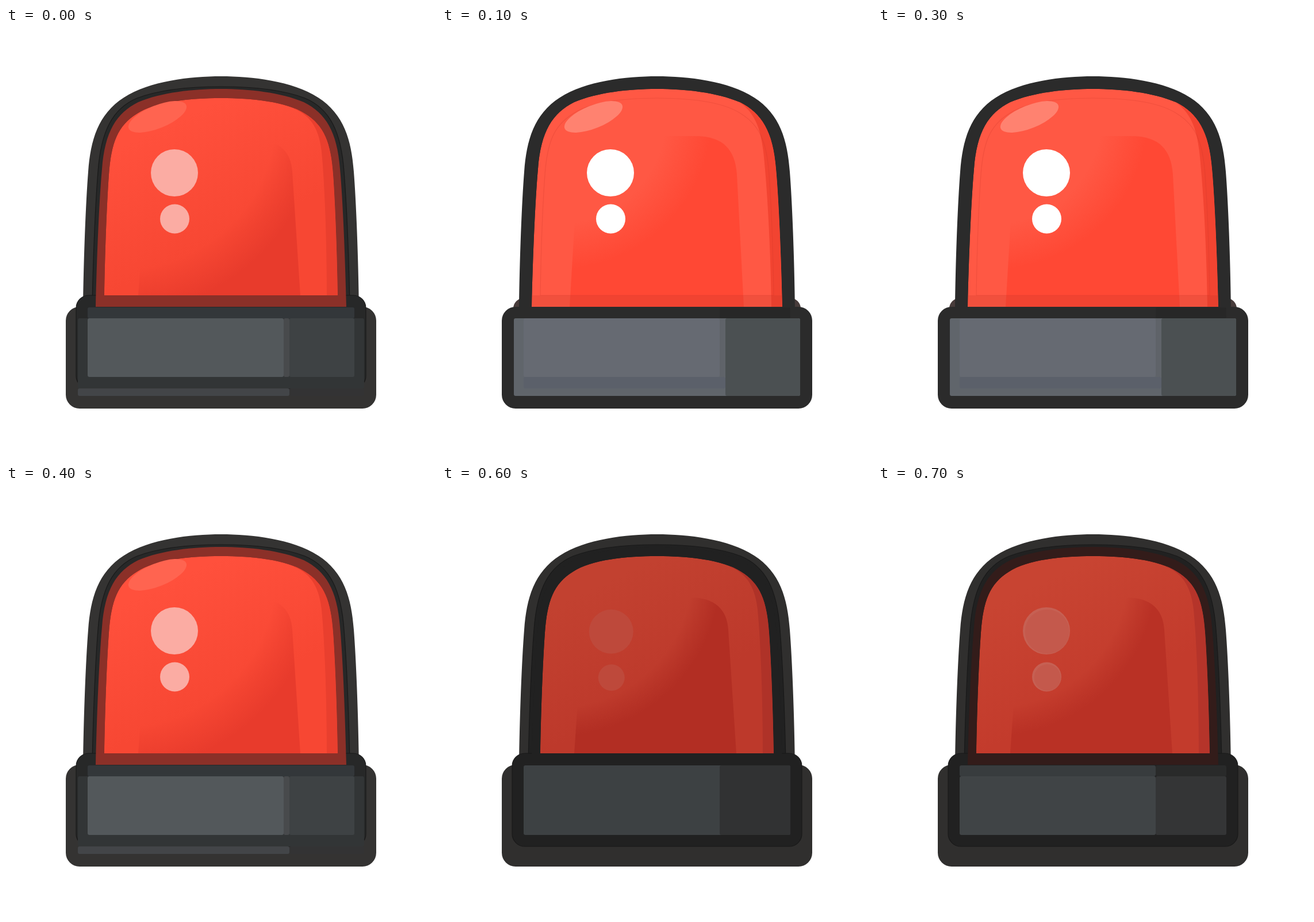
These frames come from a looping animation (748x748 px, 0.8 s). An HTML page with a canvas:

```html
<!DOCTYPE html>
<html lang="en">
<head>
<meta charset="utf-8">
<title>Warning light</title>
<style>
html, body { margin: 0; width: 100%; height: 100%; overflow: hidden; background: #fff; }
canvas { display: block; width: 100vmin; height: 100vmin; }
</style>
</head>
<body>
<canvas id="stage" width="748" height="748"></canvas>
<script>
const ctx = document.getElementById('stage').getContext('2d');
const SIZE = 748, STEP = 100;

// Left half of a dome from bottom to top, mirrored about the centre line.
function dome(p) {
  const path = new Path2D();
  const flip = i => [SIZE - p[i], p[i + 1]];
  path.moveTo(p[0], p[1]);
  for (let i = 2; i < p.length; i += 6) path.bezierCurveTo(...p.slice(i, i + 6));
  for (let i = p.length - 4; i > 0; i -= 6) {
    path.bezierCurveTo(...flip(i), ...flip(i - 2), ...flip(i - 4));
  }
  path.closePath();
  return path;
}

function box(x, y, w, h, r) {
  const path = new Path2D();
  path.roundRect(x, y, w, h, r);
  return path;
}

const big = {
  shell: dome([134, 490, 135, 400, 139, 300, 143, 250, 147, 195, 160, 150, 205, 121, 250, 92, 320, 84, 374, 84]),
  glass: dome([156, 485, 158, 400, 162, 300, 167, 245, 172, 180, 192, 148, 230, 129, 270, 112, 325, 106, 374, 106]),
  base: box(104, 485, 540, 177, 24),
  panel: new Path2D('M222 485L236 250Q240 188 300 188H440C490 188 510 212 513 255L525 485Z'),
  edge: new Path2D('M512 125C545 146 554 175 559 215C567 290 572 400 573 485H640V100Z')
};
const small = {
  shell: dome([150, 480, 152, 390, 156, 300, 160, 250, 165, 180, 185, 140, 228, 122, 270, 106, 325, 102, 374, 102]),
  glass: dome([171, 465, 172, 400, 175, 310, 179, 255, 183, 200, 194, 170, 228, 149, 260, 128, 320, 122, 374, 122]),
  base: box(122, 465, 504, 162, 22),
  panel: new Path2D('M230 465L240 318Q244 194 310 194H432C475 194 496 215 498 250L512 465Z'),
  edge: new Path2D('M500 140C533 153 545 180 549 215C556 290 558 400 558 465H640V100Z')
};

// Base fill rectangles: x, y, width, height, colour
const peak = {
  lit: true, shell: '#2b2b2b', light: '#ff5945', low: '#ff5945', panel: '#ff4935', fade: [190, 270],
  edge: '#f34532', gleam: '#ff8572', spot: '#ffffff',
  base: [[125, 505, 498, 135, '#676b74'], [493, 505, 130, 135, '#4c5153']]
};
const bright = {
  ...peak, light: '#ff5844', low: '#ff5844', panel: '#ff4834', edge: '#f24431', gleam: '#ff8270', ghost: true,
  base: [
    [125, 505, 498, 135, '#60656b'], [142, 505, 341, 102, '#666a72'], [142, 607, 351, 20, '#5b606a'],
    [483, 505, 10, 102, '#5f6369'], [493, 505, 130, 135, '#4b5052'], [483, 486, 123, 19, '#272727']
  ]
};
const mid = {
  shell: '#343332', rim: '#272828', ring: '#8b3028', light: '#ff503c', low: '#f74733', panel: '#e83b2c',
  fade: [270, 345], edge: '#e93f2e', gleam: '#ff6450', spot: '#fbaca3',
  base: [
    [125, 505, 498, 122, '#323536'], [125, 627, 368, 13, '#434548'], [493, 627, 130, 13, '#333334'],
    [142, 486, 464, 19, '#33373a'], [142, 505, 341, 102, '#53585b'],
    [483, 505, 10, 102, '#484a4c'], [493, 505, 113, 102, '#3e4244']
  ]
};
const dim = {
  shell: '#302f2e', rim: '#212121', ring: '#331c1a', light: '#c84432', low: '#c33b2c', panel: '#b93125',
  fade: [235, 285], edge: '#b5342a', spot: '#c4594c', halo: '#c66053',
  base: [
    [142, 486, 341, 19, '#383c3e'], [142, 505, 341, 102, '#404446'],
    [483, 486, 123, 19, '#292a2a'], [483, 505, 123, 102, '#343536']
  ]
};
const dark = {
  ...dim, ring: '#212121', light: '#c24130', low: '#bd392b', panel: '#b22e23', edge: '#af3228',
  spot: '#be493b', halo: null,
  base: [[142, 486, 464, 121, '#3d4143'], [483, 486, 123, 121, '#313233']]
};
const cycle = [mid, bright, peak, bright, mid, dim, dark, dim];

function fill(path, colour) {
  ctx.fillStyle = colour;
  ctx.fill(path);
}

function line(path, colour) {
  ctx.strokeStyle = colour;
  ctx.lineWidth = 1.2;
  ctx.stroke(path);
}

function disc(x, y, r, colour) {
  const path = new Path2D();
  path.arc(x, y, r, 0, 7);
  fill(path, colour);
}

function drawGlass(body, s) {
  ctx.save();
  ctx.clip(body.glass);
  const tone = ctx.createLinearGradient(280, 130, 430, 440);
  tone.addColorStop(0.1, s.light);
  tone.addColorStop(0.75, s.low);
  fill(body.glass, tone);

  const shade = ctx.createRadialGradient(200, 150, s.fade[0], 200, 150, s.fade[1]);
  shade.addColorStop(0, s.panel + '00');
  shade.addColorStop(1, s.panel);
  fill(body.panel, shade);
  fill(body.edge, s.edge);

  if (s.ghost) {
    ctx.fillStyle = 'rgba(190,50,40,.22)';
    ctx.fillRect(150, 465, 450, 20);
    line(small.glass, 'rgba(200,55,40,.25)');
  }
  ctx.restore();
}

function drawShine(s) {
  if (s.gleam) {
    const path = new Path2D();
    path.ellipse(263.5, 154.5, 54, 20, -0.384, 0, 7);
    fill(path, s.gleam);
  }
  if (s.halo) {
    disc(293, 252, 41, s.halo);
    disc(293.5, 332, 25.5, s.halo);
  }
  const inset = s.lit || s.gleam ? 0 : 2.5;
  disc(293 + inset / 2, 252 + inset / 2, 41 - inset, s.spot);
  disc(293.5 + inset / 2, 332 + inset / 2, 25.5 - inset, s.spot);
}

function draw(s) {
  ctx.fillStyle = '#fff';
  ctx.fillRect(0, 0, SIZE, SIZE);
  if (s.ghost) fill(box(124, 470, 500, 40, 18), '#483c3b');
  fill(big.shell, s.shell);
  fill(big.base, s.shell);
  if (!s.lit) {
    for (const part of [small.shell, small.base]) {
      fill(part, s.rim);
      line(part, '#191919');
    }
    fill(big.glass, s.ring);
  }
  drawGlass(s.lit ? big : small, s);
  drawShine(s);
  for (const [x, y, w, h, colour] of s.base) fill(box(x, y, w, h, 3), colour);
}

let shown = null;
function tick() {
  const s = cycle[Math.floor(performance.now() / STEP) % cycle.length];
  if (s !== shown) draw(shown = s);
  requestAnimationFrame(tick);
}
tick();
</script>
</body>
</html>
```
